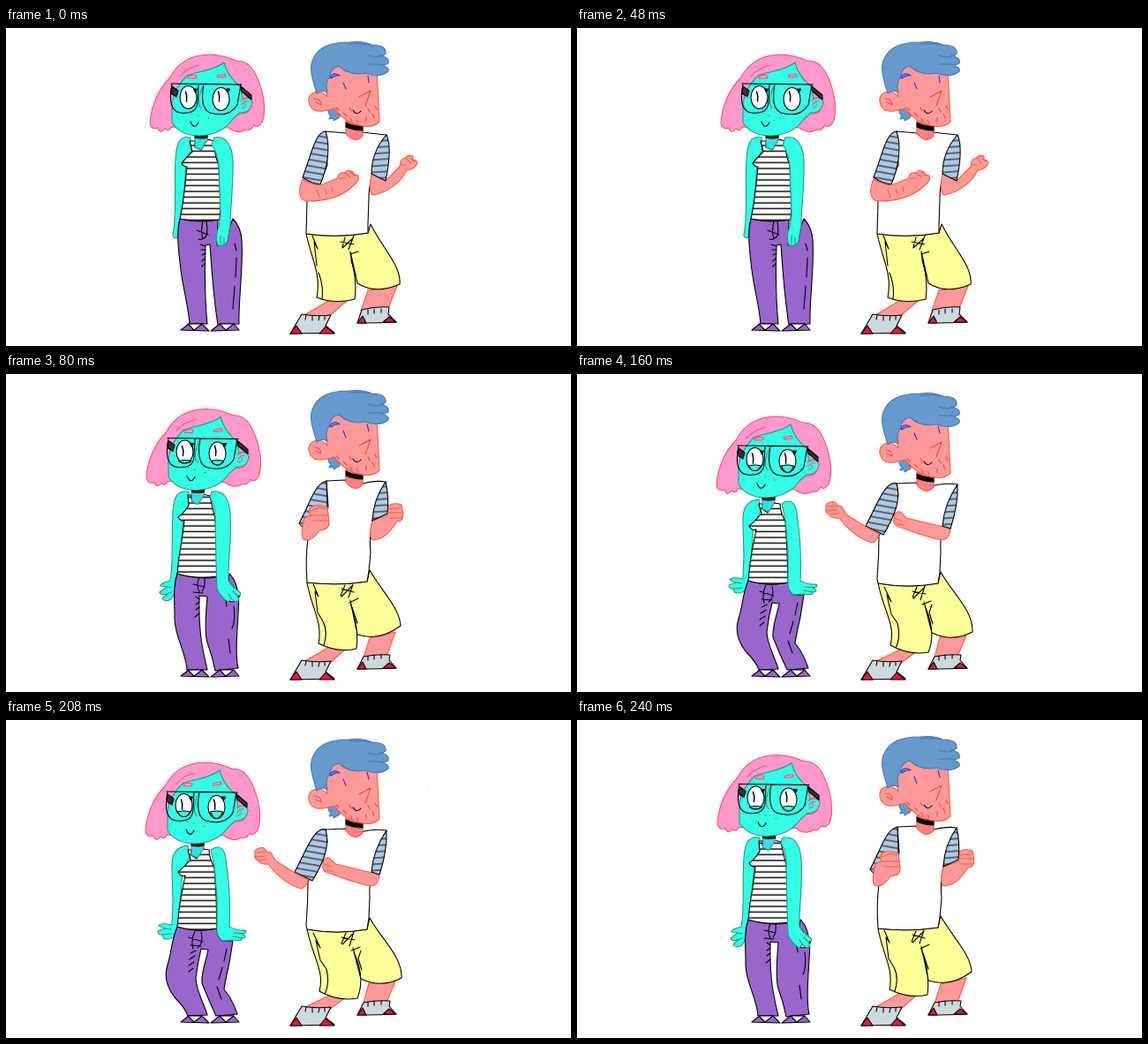
An HTML page for the animation above (320 ms loop, 640x360 px).

```html
<!DOCTYPE html>
<html lang="en">
<head>
<meta charset="utf-8">
<title>Two dancers</title>
<style>
  html, body { margin: 0; width: 100%; height: 100%; overflow: hidden; background: #fff; }
  svg { display: block; width: 100%; height: 100%; stroke-width: 1.1; stroke-linecap: round; stroke-linejoin: round; }
</style>
</head>
<body>
<svg id="stage" viewBox="0 0 640 360">
  <defs>
    <pattern id="tank" width="80" height="6.5" patternUnits="userSpaceOnUse">
      <path d="M0 0H80V6.5H0Z" fill="#f7faf7"/><path d="M0 3H80" stroke="#000" stroke-width="1.3"/>
    </pattern>
    <pattern id="sleeveL" width="60" height="7" patternUnits="userSpaceOnUse" patternTransform="rotate(10)">
      <path d="M0 0H60V7H0Z" fill="#b0c8e4"/><path d="M0 3H60" stroke="#000"/>
    </pattern>
    <pattern id="sleeveR" width="60" height="7" patternUnits="userSpaceOnUse" patternTransform="rotate(-4)">
      <path d="M0 0H60V7H0Z" fill="#b0c8e4"/><path d="M0 3H60" stroke="#000"/>
    </pattern>
  </defs>
</svg>
<script>
const TEAL = '#33ffe6', PINK = '#ff99cc', PURPLE = '#9966cc', SKIN = '#ff9999',
  BLUE = '#6699cc', YELLOW = '#ffff99', GREY = '#ccd9df', RED = '#e5173f',
  TEAL_SHADE = '#33dfe6', SKIN_SHADE = '#ff8089',
  TEAL_EDGE = '#239b78', SKIN_EDGE = '#ff5a36', ROSE = '#ff4f70', EYE = '#2238e0';

const path = (d, fill = 'none', stroke = '#000') => `<path d="${d}" fill="${fill}" stroke="${stroke}"/>`;
const group = (x, y, ...parts) => `<g transform="translate(${x} ${y})">${parts.join('')}</g>`;

const womanPoses = [
  {
    head: [0, 0], neck: [0, 0], lid: 0,
    armL: 'M209 124C197 121 193 130 192 148C190 175 194 208 189 234Q189 239 194 237L200 215L204 150L210 138Z',
    armR: 'M236 124C249 121 256 133 257 150C258 175 254 205 254 223L251 241Q248 248 240 246Q236 236 241 225L243 212L241 155Q239 140 233 132Z',
    fingers: 'M243 235V245M247 237V245',
    top: 'M208 128L211 140Q203 148 199 153Q201 157 205 157Q203 180 200 200L197 216Q220 221 242 217L243 200L241 155Q235 142 237 128L228 126L221 138L214 135V128Z',
    pants: 'M197 216C193 230 195 250 197 265C199 290 206 310 208 335H228C225 305 225 275 226 246L231 245C233 275 235 305 240 336L264 335C263 310 269 270 267 240Q266 225 257 216L254 223L251 241Q247 248 239 246L240 217Q218 221 197 216Z',
    folds: 'M223 219Q220 230 223 238M227 219Q229 232 226 237M216 229L229 234M218 239Q224 241 228 233M220 245L226 247M221 251H226M222 257L226 255M222 264L225 261M222 270L225 267M259 244L261 252M261 260L260 282M259 292L257 318'
  },
  {
    head: [-4, 9.5], neck: [-3.5, 9.5], lid: 89,
    armL: 'M207 133C194 131 190 139 189 156C187 185 190 213 186 234Q174 237 175 240L182 241L174 247Q175 251 183 249L177 254Q179 259 187 255Q193 247 192 236L197 215L201 160L207 148Z',
    armR: 'M233 133C247 131 253 142 254 158C256 188 251 216 252 234Q256 241 265 247Q267 251 262 251L264 256Q260 260 255 254L252 258Q243 253 239 243L238 215L237 160Q236 147 231 139Z',
    fingers: 'M257 246L262 251M252 249L256 255M182 241L187 242M181 249L188 247',
    top: 'M206 137L207 149Q200 159 195 162Q198 167 202 166Q200 185 196 207L194 226Q218 233 239 229V204L237 164Q233 149 231 138L223 136L216 147L210 142V137Z',
    pants: 'M194 226C189 240 191 256 191 273C190 295 204 315 205 335H228C222 310 218 290 219 251L228 252C226 275 225 295 228 304Q234 320 237 336L263 333C259 317 262 292 263 271Q266 238 253 226L252 235Q263 246 265 250L262 257Q251 260 244 251L239 230Q217 233 194 226Z',
    folds: 'M219 230Q215 239 219 247M225 231Q226 241 222 246M212 238L225 241M212 247L223 248M215 252L219 255M215 261L219 258M215 267L219 264M214 275L219 271M258 263Q260 279 256 288M252 300L254 316M247 245L250 263'
  },
  {
    head: [-5, 18], neck: [-4, 18], lid: 86,
    armL: 'M206 142C193 143 187 151 188 168L189 207Q188 225 188 232Q175 229 173 233L180 236L172 239Q172 244 178 243Q176 248 183 248Q193 247 194 239L197 210L200 172L208 155Z',
    armR: 'M232 147C242 140 248 146 249 158C253 184 254 215 253 234Q263 239 271 238Q274 241 267 242Q275 246 267 247Q268 251 258 249L245 250Q238 244 239 236L239 202L236 165Z',
    fingers: 'M258 241L269 242M257 245L268 247M180 236L187 237M178 243L188 242',
    top: 'M206 147L209 158Q201 167 195 172Q198 178 203 176Q198 200 196 215L194 234Q217 241 239 236L238 200L236 167Q230 156 230 147L223 146L216 157L210 153V147Z',
    pants: 'M194 234C187 250 188 262 183 277Q177 296 191 314Q203 326 206 335L228 334C224 320 215 306 215 292Q217 275 221 259L229 260C226 275 221 286 222 298Q230 318 238 335L262 333Q256 315 247 305Q249 292 253 275L257 250L245 250Q239 246 239 236Q217 241 194 234Z',
    folds: 'M214 239Q209 249 212 259M221 240Q224 253 217 258M207 246L223 251M209 255L221 256M209 264L215 261M208 271L214 267M207 278L213 274M207 285L212 281M250 259L247 273M245 280L241 294M239 302L244 316'
  }
];

const manPoses = [
  {
    drop: 0, eyes: 'M382 62L385 69M410 54L411 62',
    shirt: 'M362 117L385 119Q395 129 404 118Q420 120 431 121Q417 143 415 164Q411 181 411 192L410 223V232Q376 238 340 233L341 196L355 176L364 155Z',
    sleeveL: 'M362 117C350 118 346 143 336 169Q345 176 356 177C364 158 368 135 362 117Z',
    sleeveR: 'M431 121C436 132 434 154 430 173L414 165Q414 140 431 121Z',
    armL: 'M336 171C330 185 332 196 342 196C363 196 382 190 394 178Q401 173 399 167Q394 167 393 163Q386 159 384 164Q376 163 376 170L356 178Q345 177 336 171Z',
    armR: 'M414 165Q410 187 416 189C433 186 447 175 454 161Q463 160 466 153Q465 149 461 149L461 145Q454 143 453 147Q446 147 446 157L430 173Z',
    hands: 'M384 164L390 169M390 163L395 167M378 170L385 170M453 147L458 153M459 148L463 151M447 155L453 155M352 183L355 191M361 182L363 188M369 180L370 186',
    shorts: 'M340 233C347 265 357 278 352 305Q372 313 395 307Q398 287 391 261L390 253L398 289Q419 302 446 290C448 269 426 249 413 222L410 232Q376 238 340 233Z',
    legs: 'M365 309L338 325L365 327L386 309ZM410 297L402 320L433 317L443 292Z',
    sockR: 'M403 319Q419 315 434 316L433 324L442 333Q417 334 398 334Z',
    detail: 'M347 235L353 250L349 242L352 269M354 277Q360 292 358 307M384 237L381 248M394 235L388 251M379 242L394 245M381 249L393 238M390 256L399 253M391 263L396 280'
  },
  {
    drop: 3, eyes: 'M382 61L385 69M409 54L411 62',
    shirt: 'M363 121L385 120Q395 133 404 124Q418 120 430 122Q418 143 415 166Q411 185 413 202L411 223L409 235Q375 240 341 236Q339 209 342 186L355 174L365 151Z',
    sleeveL: 'M363 121C349 125 345 145 332 169L337 175L350 160L364 150Z',
    sleeveR: 'M430 122Q434 138 432 158L415 166Q416 142 430 122Z',
    armL: 'M338 163Q333 183 337 187Q346 191 355 177Q367 176 366 167L364 151Q355 147 347 150Q341 154 345 160Z',
    armR: 'M415 166Q410 187 416 188C428 187 435 179 443 167Q450 167 450 158L448 148Q439 145 433 149Q429 158 432 160Z',
    hands: 'M345 155L355 151L362 153M345 160H365M347 166H365M433 153L446 152M433 157L449 157M435 163H449',
    shorts: 'M341 236C346 265 359 281 354 305Q376 316 397 311Q400 288 391 263L390 256L398 295Q423 303 447 285C446 265 425 245 412 222L409 235Q375 240 341 236Z',
    legs: 'M366 309L337 326L366 328L384 312ZM412 299L405 321L431 320L441 292Z',
    sockR: 'M405 320Q420 317 435 318L434 324L442 333Q417 334 398 334Z',
    detail: 'M348 238L354 252L350 246L353 270L359 280Q365 292 360 307M384 239L379 251M393 238L388 253M380 243L394 247M380 252L392 240M389 259L399 254M392 264L398 282'
  },
  {
    drop: 6, eyes: 'M382 61L385 68M409 53L411 61',
    shirt: 'M362 124L384 123Q395 139 405 126Q418 123 431 125Q418 147 415 172Q411 183 412 201L411 224L409 237Q375 243 341 237L340 232Q342 207 342 183L354 164L364 138Z',
    sleeveL: 'M362 124C349 120 339 150 327 172L347 182C361 159 367 141 362 124Z',
    sleeveR: 'M431 125Q432 148 423 175L414 172Q416 147 431 125Z',
    armL: 'M327 173L305 159L300 150L295 149Q293 143 287 145Q281 146 282 152Q281 158 286 159Q287 164 297 163C310 180 322 188 335 191Q341 188 342 181Z',
    armR: 'M423 175Q422 188 412 188Q388 182 368 174Q357 172 359 164Q359 155 366 156L373 163Q398 169 423 175Z',
    hands: 'M284 150L295 149M282 155L294 154M286 159L295 158M360 163L368 166M362 170L371 171',
    shorts: 'M341 237C348 270 361 284 355 307Q376 319 398 315Q407 293 395 265L393 258L402 293Q425 304 448 292C449 267 424 247 412 224L409 237Q375 243 341 237Z',
    legs: 'M366 312L337 326L366 328L382 316ZM411 298L405 321L431 320L441 296Z',
    sockR: 'M405 320Q420 317 435 318L434 324L442 333Q417 334 398 334Z',
    detail: 'M348 241L356 258L351 250L356 272L363 282Q367 298 361 310M385 241L380 253M394 240L389 256M380 246L395 249M381 254L393 242M391 261L401 257M402 261L399 270L403 283'
  }
];

function womanEye(x, y, lid) {
  const ellipse = `<ellipse cx="${x}" cy="${y}" rx="9.5" ry="13" fill="#fff" stroke="#000"/>`;
  const eyelid = lid ? path(`M${x - 7} ${lid}Q${x} ${lid - 2} ${x + 7} ${lid}Q${x + 4} ${y + 13} ${x} ${y + 13}Q${x - 4} ${y + 13} ${x - 7} ${lid}Z`, TEAL) : '';
  return ellipse + eyelid +
    `<path d="M${x - 3} 72Q${x - 1} 77 ${x - 2} 83" fill="none" stroke="#000" stroke-width="1.5"/>` +
    path(`M${x + 6} 69L${x + 10} 69L${x + 8} 73Z`, '#000');
}

function womanHead({ head, lid }) {
  return group(...head,
    path('M163 108C164 88 173 69 185 57C194 40 208 30 231 30Q249 31 260 37Q273 36 281 49C291 67 296 92 290 107Q285 114 281 110Q277 117 272 115Q262 121 252 113L187 112Q185 118 180 114Q175 121 172 113Q165 116 163 108Z', PINK, ROSE),
    path('M247 39C237 48 216 49 205 54Q190 69 188 86V107C195 118 207 122 219 122Q245 121 257 103L265 96Q278 96 279 84Q277 77 268 80L265 66Q251 55 247 39Z', TEAL, TEAL_EDGE),
    path('M265 97Q277 98 279 84Q276 75 266 82M267 87Q270 82 274 83M267 90Q272 91 271 85M197 55Q205 45 219 42', 'none', ROSE),
    path('M206 55Q211 52 216 54L215 57L206 57ZM239 54L248 52L249 55L240 56Z', PINK, ROSE),
    path('M188 66L195 71L193 78L187 74ZM266 66L278 76V81L267 72Z', '#333'),
    womanEye(206.5, 78.5, lid), womanEye(243.5, 80.5, lid),
    path('M187 63L267 64M188 63Q182 94 198 96Q216 98 217 84L218 64M224 64Q219 91 231 96Q253 102 262 87L266 64'),
    path('M223 66Q215 83 221 91M210 97L211 97M217 99L218 99M229 102L230 102', 'none', TEAL_EDGE),
    path('M209 106Q213 116 218 107'));
}

function woman(p) {
  return path(p.armL, TEAL, TEAL_EDGE) + path(p.pants, PURPLE) + path(p.folds) +
    path(p.top, 'url(#tank)') +
    group(...p.neck, path('M214 120H228V127L221 138L214 135Z', TEAL_SHADE, TEAL_EDGE), path('M214 121Q221 124 228 121V124Q221 126 214 124Z', '#000')) +
    path(p.armR, TEAL, TEAL_EDGE) + path(p.fingers, 'none', TEAL_EDGE) + womanHead(p) +
    path('M198 342L207 335H222L230 343ZM232 343L242 335H258L264 342Z', PURPLE) +
    path('M206 335H222L213 342ZM242 335H258L249 342Z', '#fff');
}

function manHead({ drop, eyes }) {
  return group(0, drop,
    path('M385 105V119Q394 132 404 122V109Z', SKIN_SHADE, SKIN_EDGE),
    path('M385 107Q394 112 404 111V116Q394 116 385 112Z', '#000'),
    path('M366 88Q363 97 368 99L366 103Q372 101 371 105L378 101L377 90Z', BLUE, '#4479bb'),
    path('M361 45Q361 67 364 78C355 67 341 73 343 84Q346 98 364 93L372 91Q379 101 389 106Q412 117 423 106L420 46L381 40Z', SKIN, SKIN_EDGE),
    path('M352 74C348 60 343 48 347 37C353 21 368 16 389 16Q404 14 414 19Q431 19 430 29Q427 32 423 31Q435 33 433 40Q427 43 424 41Q435 45 433 49Q424 57 407 51Q390 55 377 43Q367 45 367 55Q361 61 364 73Q358 69 352 74Z', BLUE, '#4479bb'),
    path('M389 18Q401 17 414 19M410 31Q419 35 427 31M410 41L425 41', 'none', '#4479bb'),
    path('M367 55Q372 49 378 54Q373 53 368 57Z', BLUE, EYE),
    path(eyes, 'none', EYE),
    path('M400 78L413 71L407 88M349 80Q356 80 357 86M351 84L357 87M374 90L377 93M376 97L379 99M382 96L386 100M390 102L392 106M389 90L391 94M397 104L399 108M408 101V106M415 97L417 102M410 91L412 95M418 88L420 92', 'none', '#ee4938'),
    path('M393 93Q397 100 402 94'));
}

function man(p) {
  return path(p.legs, SKIN, SKIN_EDGE) + path(p.shorts, YELLOW) + path(p.detail) +
    path(p.shirt, '#fff') + path(p.armR, SKIN, SKIN_EDGE) + path(p.sleeveR, 'url(#sleeveR)') +
    path(p.sleeveL, 'url(#sleeveL)') + path(p.armL, SKIN, SKIN_EDGE) +
    path(p.hands, 'none', SKIN_EDGE) + manHead(p) +
    path('M322 346L335 324Q350 327 368 325L362 337L372 345Z', GREY) + path(p.sockR, GREY) +
    path('M322 346L329 337L335 346ZM355 346L362 338L372 346ZM398 334L404 326L408 334ZM427 333L434 327L442 333Z', RED) +
    path('M340 325L339 330M347 326V331M355 326L354 331M361 326V330M410 319V324M417 318V323M425 318V322');
}

const stage = document.getElementById('stage');
stage.insertAdjacentHTML('beforeend', '<circle cx="478.5" cy="76" r=".8" fill="#e8e8e8"/>');
const scenes = womanPoses.map((pose, i) => {
  const scene = document.createElementNS('http://www.w3.org/2000/svg', 'g');
  scene.innerHTML = woman(pose) + man(manPoses[i]);
  return stage.appendChild(scene);
});

const order = [0, 1, 2, 1], hold = 80;
function draw() {
  const current = order[Math.floor(performance.now() / hold) % order.length];
  scenes.forEach((scene, i) => { scene.style.display = i === current ? '' : 'none'; });
  requestAnimationFrame(draw);
}
draw();
</script>
</body>
</html>
```
